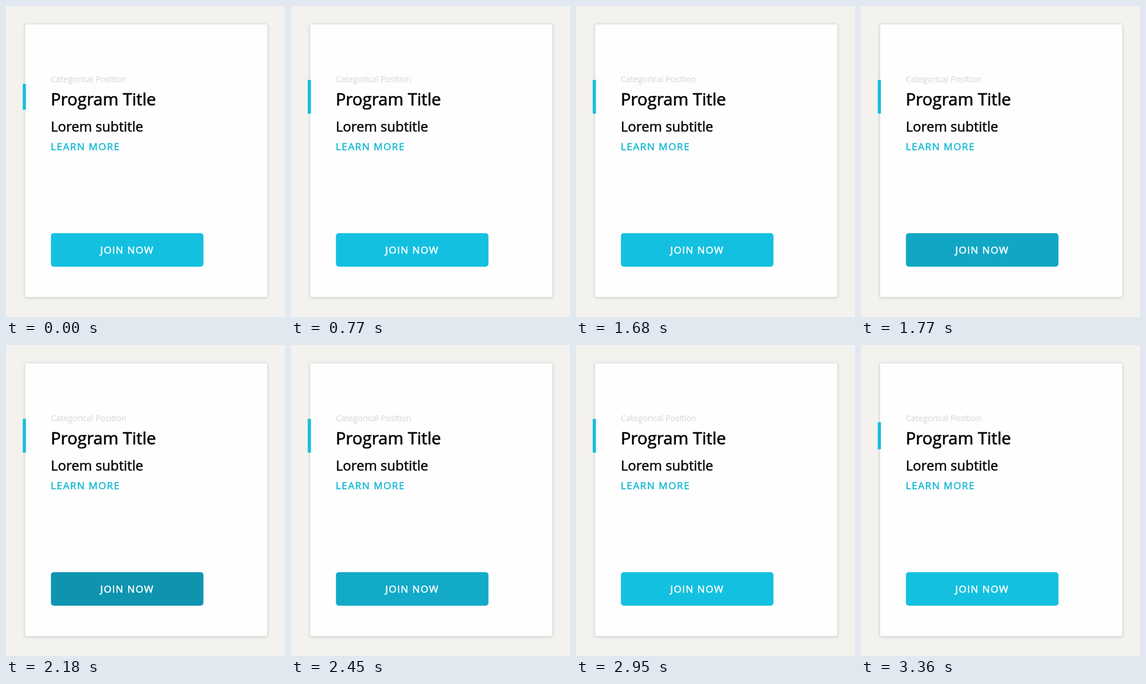
An HTML page that plays this animation: 480 by 535 pixels, repeating every 3.4 s.

```html
<!DOCTYPE html>
<html lang="en">
<head>
<meta charset="utf-8">
<title>Program card</title>
<style>
  html, body { margin: 0; width: 100%; height: 100%; overflow: hidden; background: #f3f2ee; }
  svg { display: block; width: 480px; height: 535px; font-family: "Open Sans", sans-serif; }
  text { fill: #060606; stroke: #060606; stroke-width: .55; }
  .card { fill: #fefefe; stroke: #dedee1; filter: drop-shadow(0 1px 2px rgba(0, 0, 0, .14)); }
  .category { font-size: 14.1px; fill: #e0e1e5; stroke: #e0e1e5; }
  .title { font-size: 29px; stroke-width: .7; }
  .subtitle { font-size: 23.6px; }
  .link { font-size: 17px; letter-spacing: 1.38px; fill: #18b9d5; stroke: #18b9d5; }
  .label { font-size: 17px; letter-spacing: 1.35px; fill: #fff; stroke: #fff; }
</style>
</head>
<body>
<svg viewBox="0 0 480 535">
  <rect class="card" x="32.5" y="31" width="417.5" height="470" rx="3"/>
  <rect id="bar" x="28.8" width="5.5" fill="#17bedb"/>
  <text class="category" x="77.1" y="131">Categorical Position</text>
  <text class="title" x="76.9" y="171">Program Title</text>
  <text class="subtitle" x="77.1" y="216.3">Lorem subtitle</text>
  <text class="link" x="77.1" y="248">LEARN MORE</text>
  <rect id="button" x="77.3" y="390.7" width="262.4" height="57.7" rx="5"/>
  <text class="label" x="162.3" y="426.3">JOIN NOW</text>
</svg>
<script>
const LOOP = 3400, FADE = 160;
const bar = document.getElementById('bar');
const button = document.getElementById('button');
const light = [20, 192, 224], dark = [15, 148, 176];

// Eased 0 to 1 over FADE ms from the given start
function ease(t, start) {
  const p = Math.min(1, Math.max(0, (t - start) / FADE));
  return p * p * (3 - 2 * p);
}

const hover = (t, enter, leave) => ease(t, enter) - ease(t, leave);

function draw(now) {
  const t = now % LOOP;
  const height = 44.5 + 13.5 * hover(t, 550, 3240);
  bar.setAttribute('y', 156.1 - height / 2);
  bar.setAttribute('height', height);

  const shade = hover(t, 1683, 2370);
  const rgb = light.map((c, i) => Math.round(c + (dark[i] - c) * shade));
  button.setAttribute('fill', `rgb(${rgb})`);
  requestAnimationFrame(draw);
}

draw(0);
</script>
</body>
</html>
```
